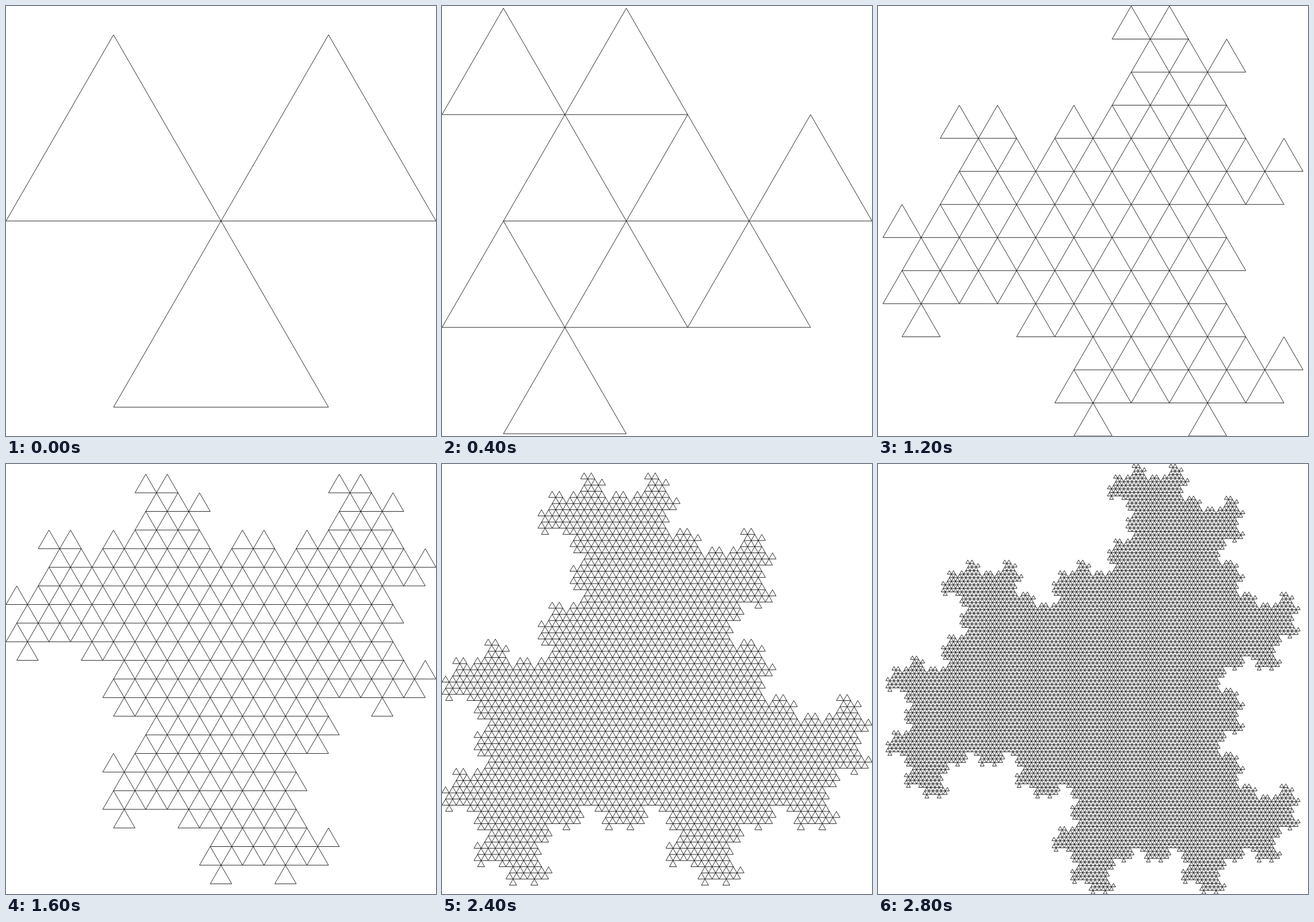
These frames come from a looping animation (748x748 px, 3.2 s). An HTML page with a canvas:

```html
<!DOCTYPE html>
<html lang="en">
<head>
<meta charset="utf-8">
<title>Triangle dragon</title>
<style>
  html, body { margin: 0; width: 100%; height: 100%; overflow: hidden; background: #fff; }
  canvas { position: absolute; left: 0; top: 0; opacity: 0; }
  canvas:first-of-type { opacity: 1; }
</style>
</head>
<body>
<script>
const SIZE = 748;
const LEVELS = 8;
const STEP_MS = 400;
const LINE_WIDTH = 0.85;
const ROW = Math.sqrt(3) / 2; // height of a triangle with side 1

const polar = (radius, degrees) => {
  const angle = degrees * Math.PI / 180;
  return [radius * Math.cos(angle), radius * Math.sin(angle)];
};

// Each level joins three copies; the offsets grow by sqrt(3) and turn by 30 degrees.
function grow(apexes, level) {
  const radius = 3 ** (level / 2);
  const offsets = [[0, 0], polar(radius, 30 * level), polar(radius, 30 * level + 60)];
  return offsets.flatMap(([dx, dy]) => apexes.map(([x, y]) => [x + dx, y + dy]));
}

function range(values) {
  let min = Infinity, max = -Infinity;
  for (const v of values) {
    min = Math.min(min, v);
    max = Math.max(max, v);
  }
  return [min, max];
}

// Draws upright triangles below their apexes, scaled and centred to fill the stage.
function drawLevel(apexes) {
  const canvas = document.createElement('canvas');
  canvas.width = canvas.height = SIZE;
  const ctx = canvas.getContext('2d');

  const [minX, maxX] = range(apexes.map(p => p[0]));
  const [minY, maxY] = range(apexes.map(p => p[1]));
  const side = SIZE / Math.max(maxX - minX + 1, maxY - minY + ROW);
  const left = SIZE / 2 - side * (minX + maxX) / 2;
  const top = SIZE / 2 - side * (minY + maxY + ROW) / 2;

  ctx.beginPath();
  for (const [ax, ay] of apexes) {
    const x = left + ax * side, y = top + ay * side;
    ctx.moveTo(x, y);
    ctx.lineTo(x + side / 2, y + side * ROW);
    ctx.lineTo(x - side / 2, y + side * ROW);
    ctx.closePath();
  }
  ctx.lineWidth = LINE_WIDTH;
  ctx.lineJoin = 'bevel';
  ctx.strokeStyle = '#000';
  ctx.stroke();
  return canvas;
}

const canvases = [];
let apexes = [[0, 0]];
for (let level = 0; level < LEVELS; level++) {
  apexes = grow(apexes, level);
  canvases.push(drawLevel(apexes));
}
document.body.append(...canvases);

// Every level shows for the first step of its own cycle, shifted to its turn.
canvases.forEach((canvas, i) => {
  canvas.animate([
    { opacity: 1, offset: 0, easing: 'step-end' },
    { opacity: 0, offset: 1 / LEVELS },
    { opacity: 0, offset: 1 }
  ], {
    duration: LEVELS * STEP_MS,
    iterations: Infinity,
    iterationStart: (LEVELS - i) % LEVELS / LEVELS
  });
});
</script>
</body>
</html>
```
